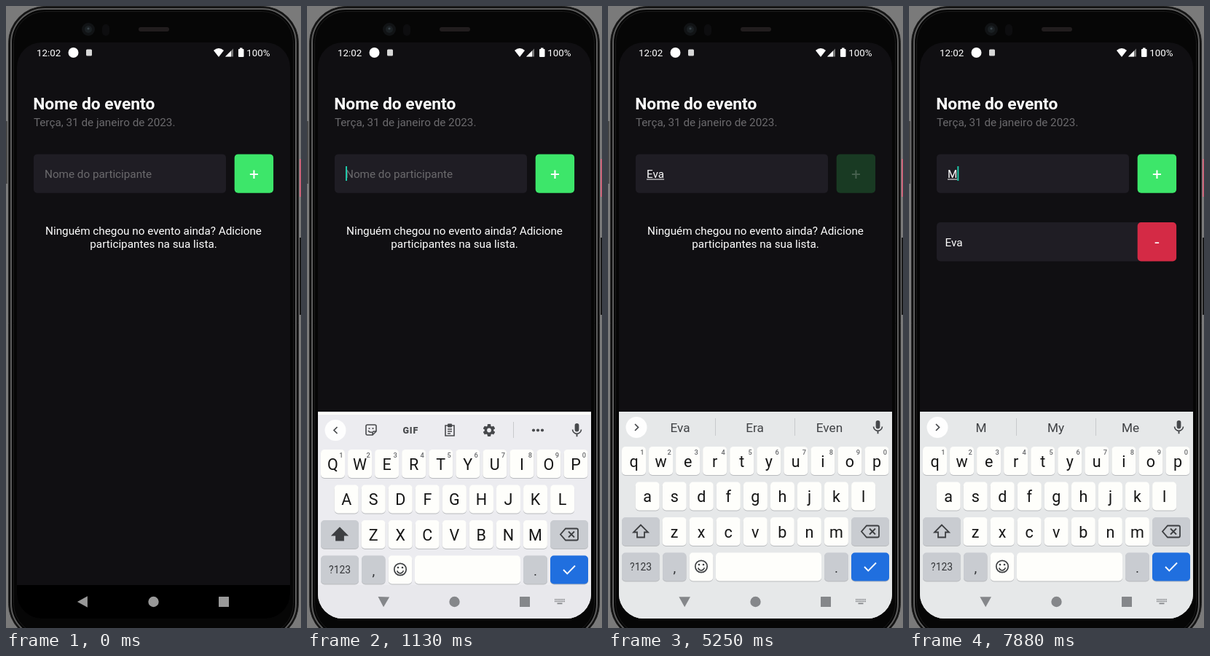
These frames come from a looping animation (405x854 px, 8 s). An HTML page with a canvas:

```html
<!DOCTYPE html>
<html lang="pt-BR">
<head>
<meta charset="utf-8">
<title>Lista de participantes</title>
<style>
  html, body { margin: 0; width: 100%; height: 100%; overflow: hidden; background: #7a7a7a; }
  canvas { display: block; width: 405px; height: 854px; }
</style>
</head>
<body>
<canvas id="stage"></canvas>
<script>
const W = 405, H = 854, LOOP = 8000, TICK = 125;
const canvas = document.getElementById('stage');
const ctx = canvas.getContext('2d');
const dpr = window.devicePixelRatio || 1;
canvas.width = W * dpr;
canvas.height = H * dpr;

const GUEST = 'Eva';
const BG = '#100f12', FIELD = '#1f1d24', GREEN = '#3de66a', RED = '#d42a45';
const INK = '#46484b', KEY = '#fefefb', FN_KEY = '#c9ccd1';
const KB_TOP = 557, KB_TRAVEL = 284;
const FOCUS = 875, SLIDE = 285, BLINK = 500, PRESS = 5250, ADDED = 5375;

// [start, typed text, suggestions]; the caret blinks anew from each start
const TYPING = [
  [FOCUS, ''],
  [2125, GUEST.slice(0, 1), ['E', 'End', 'Eat']],
  [3500, GUEST.slice(0, 2), ['E', 'End', 'Eat']],
  [3625, GUEST.slice(0, 2), ['Ev', 'Ever', 'Even']],
  [3750, GUEST, [GUEST, 'Era', 'Even']],
  [ADDED, ''],
  [7875, 'M', ['M', 'My', 'Me']]
];

const MIC = new Path2D('M12 14a3 3 0 0 0 3-3V5a3 3 0 0 0-6 0v6a3 3 0 0 0 3 3zM17.3 11c0 3-2.5 5.1-5.3 5.1S6.7 14 6.7 11H5c0 3.4 2.7 6.2 6 6.7V21h2v-3.3c3.3-.5 6-3.3 6-6.7z');
const SHIFT = new Path2D('M0-9L-10 1H-5V8H5V1H10Z');
const ERASE = new Path2D('M-5-8H10Q12-8 12-6V6Q12 8 10 8H-5L-12 0ZM-1-4L7 4M7-4L-1 4');
const STICKER = new Path2D('M-5-7H5Q7-7 7-5V2L2 7H-5Q-7 7-7 5V-5Q-7-7-5-7ZM7 2H4Q2 2 2 4V7M-4 1Q-2 4 1 3');
const CLIP = new Path2D('M-6-6H6V8H-6ZM-3-1H3M-3 2H3M-3 5H1');

function box(x, y, w, h, r, fill) {
  ctx.beginPath();
  ctx.roundRect(x, y, w, h, r);
  ctx.fillStyle = fill;
  ctx.fill();
}

function disc(x, y, r, fill) {
  ctx.beginPath();
  ctx.arc(x, y, r, 0, Math.PI * 2);
  ctx.fillStyle = fill;
  ctx.fill();
}

function poly(points, fill) {
  ctx.beginPath();
  points.forEach(([x, y]) => ctx.lineTo(x, y));
  ctx.fillStyle = fill;
  ctx.fill();
}

function line(points, color, width) {
  ctx.beginPath();
  points.forEach(([x, y], i) => i ? ctx.lineTo(x, y) : ctx.moveTo(x, y));
  ctx.strokeStyle = color;
  ctx.lineWidth = width;
  ctx.stroke();
}

function label(str, x, y, size, color, align = 'left', weight = 400) {
  ctx.font = `${weight} ${size}px Roboto, sans-serif`;
  ctx.textAlign = align;
  ctx.fillStyle = color;
  ctx.fillText(str, x, y);
}

function at(x, y, draw) {
  ctx.save();
  ctx.translate(x, y);
  draw();
  ctx.restore();
}

function icon(path, x, y, width, color = INK) {
  at(x, y, () => {
    ctx.strokeStyle = color;
    ctx.lineWidth = width;
    ctx.stroke(path);
  });
}

// one layer of the phone body, inset from its outer edge
function shell(inset, fill, rim, width) {
  box(3.5 + inset, 0.5 + inset, 398 - 2 * inset, 870 - 2 * inset, 50 - inset, fill);
  ctx.strokeStyle = rim;
  ctx.lineWidth = width;
  ctx.stroke();
}

function drawPhone() {
  ctx.fillStyle = '#7a7a7a';
  ctx.fillRect(0, 0, W, H);
  shell(0, '#121212', '#222', 1);
  shell(3.5, '#050505', '#5c5c5c', 2);
  shell(7, '#060606', '#1a1a1a', 1);
  box(403, 210, 2, 52, 0, '#c9657a');
  box(403, 318, 2, 106, 0, '#1a1a1a');
  box(0, 158, 2, 86, 0, '#4a4a4a');

  disc(113, 32, 9, '#111315');
  disc(113, 32, 5, '#1b2023');
  disc(113, 31, 1.6, '#39434a');
  box(132, 25, 10, 16, 5, '#0d0d0f');
  box(182, 29, 42, 6, 3, '#211d1e');
}

function drawStatus() {
  label('12:02', 42, 69, 13.36, '#fff');
  disc(92.5, 64, 7, '#fff');
  box(110, 59.5, 8, 9, 1.5, '#d8d8d8');
  ctx.beginPath();
  ctx.moveTo(292, 70);
  ctx.lineTo(285, 61);
  ctx.quadraticCurveTo(292, 55, 299, 61);
  ctx.fillStyle = '#fff';
  ctx.fill();
  poly([[301, 69.5], [312, 69.5], [312, 58.5]], '#777');
  poly([[301, 69.5], [309, 69.5], [309, 61.5]], '#fff');
  box(319, 59, 7.5, 11, 1, '#fff');
  box(321, 57.5, 3.5, 2, 0, '#fff');
  label('100%', 330.3, 69, 13.36, '#fff');
}

function drawButton(sign, y, fill) {
  box(313.7, y, 53.4, 53.4, 5, fill);
  label(sign, 340.4, y + 35.4, 22.9, '#fff', 'center');
}

function drawApp(s) {
  label('Nome do evento', 37.2, 142, 22.8, '#fff', 'left', 700);
  label('Terça, 31 de janeiro de 2023.', 37.9, 165, 15.27, '#6b6a6d');

  box(38, 203.4, 264, 53.4, 5, FIELD);
  let caretX = 53;
  if (s.text) {
    label(s.text, 53, 236, 15.27, '#fff');
    const w = ctx.measureText(s.text).width;
    ctx.fillRect(53, 237.5, w, 1);
    caretX += w;
  } else {
    label('Nome do participante', 53, 236, 15.27, '#6b6a6d');
  }
  if (s.caret) box(caretX, 220, 2, 20, 0, '#1fc8aa');

  ctx.globalAlpha = s.press;
  drawButton('+', 203.4, GREEN);
  ctx.globalAlpha = 1;

  if (s.listed) {
    box(38, 297, 300, 53.4, 5, FIELD);
    label(GUEST, 49.5, 330, 15.27, '#fff');
    drawButton('-', 297, RED);
  } else {
    label('Ninguém chegou no evento ainda? Adicione', 202.5, 313.5, 15.27, '#fff', 'center');
    label('participantes na sua lista.', 202.5, 331.5, 15.27, '#fff', 'center');
  }
}

function key(x, y, w, fill = KEY) {
  box(x, y + 1, w, 39, 5, '#b9bbbe');
  box(x, y, w, 39, 5, fill);
}

function drawGear(x, y) {
  at(x, y, () => {
    for (let i = 0; i < 6; i++) {
      ctx.rotate(Math.PI / 3);
      box(-2.3, -8.4, 4.6, 5, 1, INK);
    }
  });
  ctx.beginPath();
  ctx.arc(x, y, 4.6, 0, Math.PI * 2);
  ctx.strokeStyle = INK;
  ctx.lineWidth = 3.4;
  ctx.stroke();
}

function drawTools() {
  line([[41.5, 574], [37, 578.5], [41.5, 583]], INK, 1.7);
  icon(STICKER, 88, 578, 1.6);
  disc(85.5, 576, 1.1, INK);
  disc(90.5, 576, 1.1, INK);
  ctx.letterSpacing = '0.8px';
  label('GIF', 142.3, 582.5, 12.5, INK, 'center', 900);
  ctx.letterSpacing = '0px';
  icon(CLIP, 196, 578, 1.6);
  box(193, 569.5, 6, 5, 1, INK);
  drawGear(250, 578.5);
  box(283, 567, 1, 22, 0, '#c8cacc');
  for (const x of [311, 317, 323]) disc(x, 578.5, 2.1, INK);
}

function drawSuggestions(words) {
  line([[37, 574], [41.5, 578.5], [37, 583]], INK, 1.7);
  words.forEach((word, i) => label(word, 99 + i * 102.5, 585, 17.2, '#3f4144', 'center'));
  box(147, 566, 1, 24, 0, '#c8cacc');
  box(256, 566, 1, 24, 0, '#c8cacc');
}

function drawKeys(caps) {
  const rows = [['qwertyuiop', 19, 605], ['asdfghjkl', 37.7, 653.5], ['zxcvbnm', 74.6, 702]];
  for (const [letters, x0, y] of rows) {
    [...letters].forEach((ch, i) => {
      const x = x0 + i * 37.05;
      key(x, y, 33);
      label(caps ? ch.toUpperCase() : ch, x + 16.5, y + 27.5, 21.5, '#151515', 'center');
      if (y === 605) label((i + 1) % 10, x + 28, y + 10.5, 9.3, '#66686b', 'center', 500);
    });
  }

  key(19, 702, 52, FN_KEY);
  at(45, 721.5, () => {
    ctx.strokeStyle = ctx.fillStyle = '#3d3f42';
    ctx.lineWidth = 1.8;
    if (caps) ctx.fill(SHIFT);
    ctx.stroke(SHIFT);
  });
  key(334, 702, 52, FN_KEY);
  icon(ERASE, 360, 721.5, 1.8, '#3d3f42');

  key(19, 750.5, 52, FN_KEY);
  label('?123', 45, 775, 13.8, '#333538', 'center');
  key(75, 750.5, 32.5, FN_KEY);
  label(',', 91.3, 777.5, 19, '#333538', 'center');
  key(111.7, 750.5, 32.5);
  ctx.beginPath();
  ctx.arc(128, 769.5, 8.2, 0, Math.PI * 2);
  ctx.moveTo(132.2, 771.3);
  ctx.arc(128, 770.5, 4.3, 0.2, Math.PI - 0.2);
  ctx.strokeStyle = '#3d3f42';
  ctx.lineWidth = 1.7;
  ctx.stroke();
  disc(125, 767, 1.3, '#3d3f42');
  disc(131, 767, 1.3, '#3d3f42');
  key(148, 750.5, 145);
  key(297, 750.5, 33, FN_KEY);
  label('.', 313.5, 777.5, 19, '#333538', 'center');
  key(334, 750.5, 52, '#206fdf');
  line([[352, 770], [357.3, 775.3], [368, 764.5]], '#fff', 1.9);
}

function drawKeyboard(s) {
  const drop = Math.round(KB_TRAVEL * s.hidden);
  box(15, KB_TOP, 375, 290, 0, '#fffffc');
  at(0, drop, () => {
    box(15, KB_TOP, 375, 290, 0, drop ? '#ececf0' : '#e6e8e9');
    ctx.globalAlpha = 1 - 0.9 * s.hidden;
    disc(39, 578.5, 14.5, '#fefefe');
    s.text ? drawSuggestions(s.words) : drawTools();
    at(359, 567, () => {
      ctx.scale(0.96, 0.96);
      ctx.fillStyle = INK;
      ctx.fill(MIC);
    });
    ctx.globalAlpha = 1;
    drawKeys(!s.text);
  });
}

function drawNav(hidden) {
  box(15, 795, 375, 46, 0, `rgba(0,0,0,${hidden})`);
  const color = hidden > 0.1 ? 'rgba(255,255,255,0.6)' : '#85878a';
  at(105.2, 818, () => {
    ctx.rotate((hidden - 1) * Math.PI / 2);
    poly([[-7.3, 0], [6.7, -7.8], [6.7, 7.8]], color);
  });
  disc(202.5, 818, 7.2, color);
  box(292, 811, 14, 14, 0.5, color);
  if (hidden > 0.5) return;
  for (let i = 0; i < 14; i++) {
    box(340 + (i % 7) * 2.1, 814 + Math.floor(i / 7) * 2.6, 1.4, 1.6, 0, color);
  }
  box(343.5, 819.6, 7, 1.6, 0, color);
}

function stateAt(t) {
  const [since, text, words] = TYPING.filter(([start]) => start <= t).pop() || TYPING[0];
  const slide = Math.min(1, Math.max(0, (t - FOCUS) / SLIDE));
  let press = 1;
  if (t >= PRESS) press = t < ADDED ? 0.2 : Math.min(1, 0.4 + (t - ADDED) / 250);
  return {
    text, words, press,
    hidden: (1 - slide) ** 2,
    caret: t >= FOCUS && Math.floor((t - since) / BLINK) % 2 === 0,
    listed: t >= ADDED
  };
}

function render(now) {
  const s = stateAt(Math.floor((now % LOOP) / TICK) * TICK);
  ctx.setTransform(dpr, 0, 0, dpr, 0, 0);
  drawPhone();
  ctx.save();
  ctx.beginPath();
  ctx.roundRect(15, 50, 375, 791, 34);
  ctx.clip();
  ctx.fillStyle = BG;
  ctx.fillRect(15, 50, 375, 791);
  drawStatus();
  drawApp(s);
  if (s.hidden < 1) drawKeyboard(s);
  drawNav(s.hidden);
  ctx.restore();
}

const start = performance.now();
function loop() {
  render(performance.now() - start);
  requestAnimationFrame(loop);
}
loop();
</script>
</body>
</html>
```
